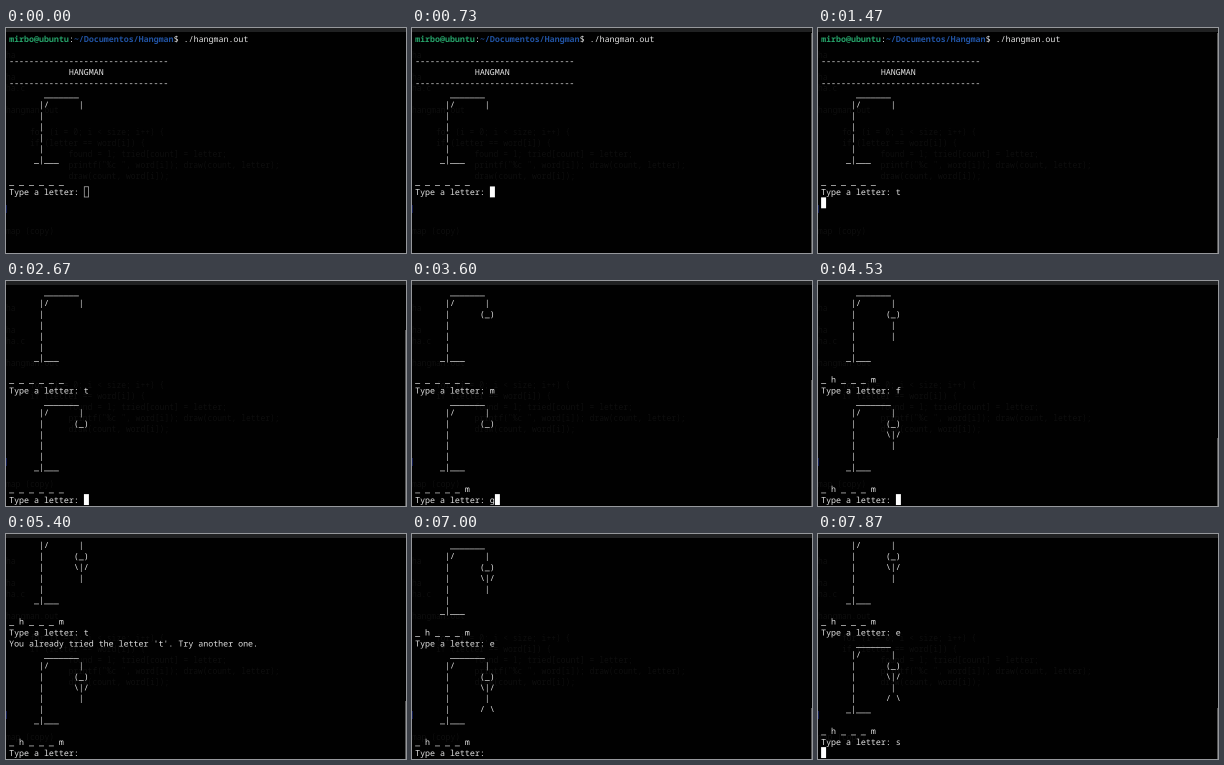
Animation of 400 by 225 pixels, one loop 8000 ms. Source, as an HTML page with a canvas:

```html
<!DOCTYPE html>
<html lang="en">
<head>
<meta charset="utf-8">
<title>Hangman in a terminal</title>
<style>
  html, body { margin: 0; width: 100%; height: 100%; overflow: hidden; background: #000; }
  #stage { position: relative; width: 400px; height: 225px; overflow: hidden; background: #010101; }
  #stage > * { position: absolute; margin: 0; }
  #bar { left: 0; top: 0; width: 400px; height: 4px; background: #202122; }
  #thumb { right: 0; bottom: 0; width: 1px; background: #555; }
  #mark { left: 0; top: 177px; width: 1px; height: 8px; background: #101a50; }
  #ghost { left: 0; top: 21px; color: #0e0e0e; font: 8px/11px "Noto Sans Mono", monospace; }
  #screen { left: 0; top: 0; width: 400px; height: 225px; }
</style>
</head>
<body>
<div id="stage">
  <div id="bar"></div><div id="thumb"></div><div id="mark"></div>
  <pre id="ghost">ha

ha
ha.c

hangman.out

     for (i = 0; i &lt; size; i++) {
     if (letter == word[i]) {
             found = 1; tried[count] = letter;
             printf("%c ", word[i]); draw(count, letter);
             draw(count, word[i]);




map (copy)</pre>
  <canvas id="screen" width="800" height="450"></canvas>
</div>
<script>
const LOOP = 8000, ROWS = 20, LEFT = 3.1, TOP = 5.3;
const CELL_W = 4.9875, CELL_H = 10.9375, BASELINE = 8.8;
const FONT = '8.3125px "Noto Sans Mono", monospace';
const WHITE = '#e4e4e4', GREEN = '#26a269', BLUE = '#2152a0';
const PROMPT = 'Type a letter: ';
const COMMAND = [['mirbo@ubuntu', GREEN], [':', WHITE], ['~/Documentos/Hangman', BLUE], ['$ ./hangman.out', WHITE]];
const thumb = document.getElementById('thumb');
const ctx = document.getElementById('screen').getContext('2d');
ctx.scale(2, 2);
ctx.textRendering = 'geometricPrecision';

const HEAD = ['(_)'];
const BODY = ['(_)', ' | ', ' | '];
const ARMS = ['(_)', '\\|/', ' | '];
const LEGS = [...ARMS, '/ \\'];

const gallows = parts => [
  ' '.repeat(7) + '_'.repeat(7),
  '      |/      |',
  ...[0, 1, 2, 3].map(i => '      |      ' + (parts[i] || '')),
  '     _|___',
  ''
];

// Each action changes the terminal state: its lines and its cursor.
const type = letter => s => { s.lines[s.lines.length - 1] += letter; s.cursor = 'on'; };
const enter = s => { s.lines.push(''); s.cursor = 'on'; };
const blink = cursor => s => { s.cursor = cursor; };
const round = (parts, word, cursor = 'off', note = []) => s => {
  s.lines.pop();
  s.lines.push(...note, ...gallows(parts), word.split('').join(' '), PROMPT);
  s.cursor = cursor;
};
const start = s => {
  const rule = '-'.repeat(32);
  s.lines.push(COMMAND, '', rule, ' '.repeat(12) + 'HANGMAN', rule, '');
  round([], '______', 'hollow')(s);
};

const script = [
  [0, start], [530, blink('on')], [800, blink('off')], [1070, blink('on')],
  [1330, type('t')], [1470, enter], [1730, round(HEAD, '______')],
  [2070, blink('on')], [2400, blink('off')], [2670, blink('on')],
  [2730, type('m')], [2800, enter], [3070, round(HEAD, '_____m')],
  [3330, blink('on')],
  [3600, type('g')], [3670, enter], [3930, round(BODY, '_____m')],
  [4000, type('h')], [4070, enter], [4130, round(BODY, '_h___m')],
  [4400, blink('on')],
  [4470, type('f')], [4530, enter], [4530, round(ARMS, '_h___m', 'on')],
  [5070, type('t')], [5070, enter],
  [5400, round(ARMS, '_h___m', 'off', ["You already tried the letter 't'. Try another one."])],
  [5530, blink('on')], [5670, blink('off')],
  [5930, type('e')], [6000, enter], [6130, round(LEGS, '_h___m', 'on')],
  [7000, blink('off')], [7270, blink('on')], [7530, blink('off')], [7600, blink('on')],
  [7800, type('s')], [7870, enter]
];

function drawLine(line, row) {
  const spans = typeof line === 'string' ? [[line, WHITE]] : line;
  let x = LEFT;
  for (const [text, color] of spans) {
    ctx.font = (color === WHITE ? '' : 'bold ') + FONT;
    ctx.fillStyle = color;
    ctx.fillText(text, x, TOP + row * CELL_H + BASELINE);
    x += text.length * CELL_W;
  }
}

function drawCursor(style, column, row) {
  const x = LEFT + column * CELL_W, y = TOP + row * CELL_H;
  ctx.fillStyle = '#fff';
  ctx.strokeStyle = '#bbb';
  ctx.lineWidth = 0.7;
  if (style === 'on') ctx.fillRect(x, y, CELL_W, CELL_H);
  if (style === 'hollow') ctx.strokeRect(x + 0.35, y + 0.35, CELL_W - 0.7, CELL_H - 0.7);
}

function render(count) {
  const state = { lines: [], cursor: 'on' };
  script.slice(0, count).forEach(([, act]) => act(state));
  const { lines, cursor } = state;
  const view = lines.slice(-ROWS);
  const row = view.length - 1;
  ctx.clearRect(0, 0, 400, 225);
  view.forEach(drawLine);
  drawCursor(cursor, view[row].length, row);
  // The scroll thumb shrinks as the history grows.
  thumb.style.height = 220 * Math.min(1, ROWS / lines.length) + 'px';
  thumb.style.visibility = cursor === 'hollow' ? 'hidden' : 'visible';
}

let shown = 0;
const origin = performance.now();
function tick() {
  const time = (performance.now() - origin) % LOOP;
  const count = script.filter(([at]) => at <= time).length;
  if (count !== shown) render(shown = count);
  requestAnimationFrame(tick);
}
tick();
</script>
</body>
</html>
```
